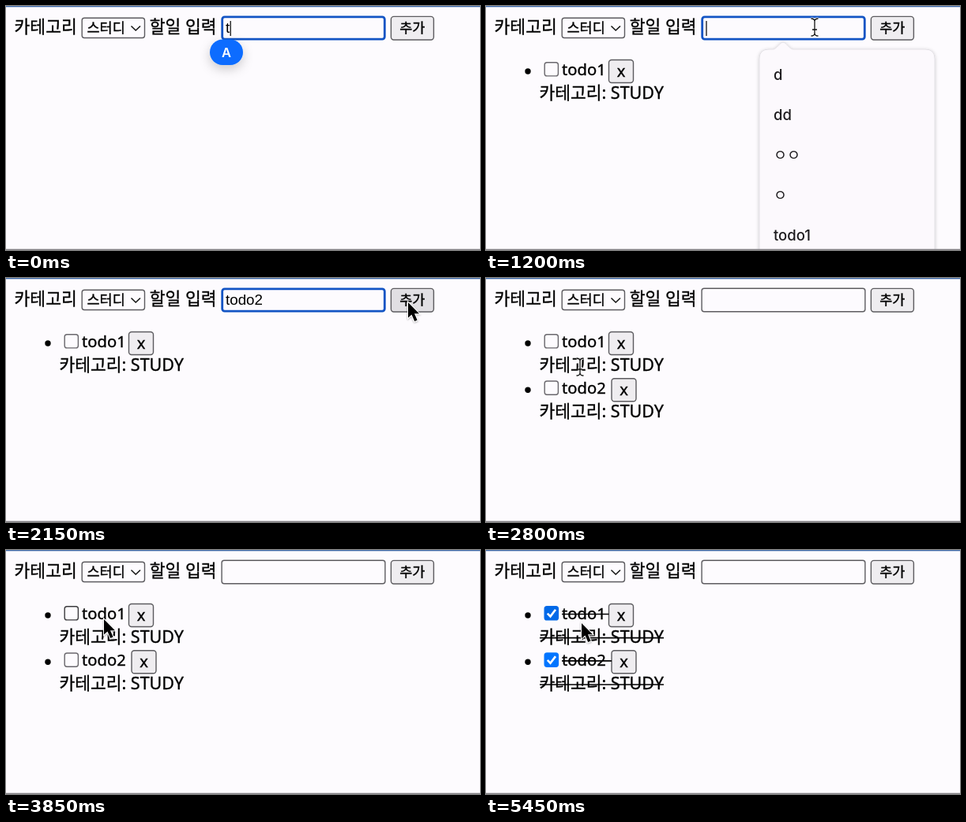
Recreate the animation shown at these times as an HTML page. Size 600x310 px, loop 5500 ms.

```html
<!DOCTYPE html>
<html lang="ko">
<head>
<meta charset="utf-8">
<title>할일</title>
<style>
html, body { margin: 0; width: 100%; height: 100%; overflow: hidden; background: #fdfbfe; }
svg { display: block; width: 600px; height: 310px; }
text { white-space: pre; font-family: "Noto Sans", "Noto Sans CJK KR", "Noto Sans CJK", sans-serif; }
.label, .task, .control { stroke: #000; stroke-width: .35; }
.label { font-size: 21.5px; }
.task { font-size: 20.2px; }
.control { font-size: 17.5px; }
.field { font: 18.8px "Liberation Sans", Arial, sans-serif; }
.option { font: 500 18.5px Inter, "Noto Sans CJK KR", "Noto Sans CJK", sans-serif; fill: #1d1b1e; }
.box { fill: #fdfbfe; stroke: #5c5b5f; stroke-width: 1.4; }
.button { fill: #efedf0; stroke: #5c5b5f; stroke-width: 1.4; }
</style>
</head>
<body>
<svg id="stage" viewBox="0 0 600 310">
  <defs>
    <filter id="soft" x="-50%" y="-50%" width="200%" height="220%">
      <feDropShadow dx="0" dy="5" stdDeviation="7" flood-opacity=".2"/>
    </filter>
    <filter id="glow" x="-10%" y="-10%" width="120%" height="120%">
      <feDropShadow dx="0" dy="1" stdDeviation="2" flood-opacity=".22"/>
    </filter>
    <filter id="drop" x="-50%" y="-30%" width="200%" height="170%">
      <feDropShadow dx="0" dy="1" stdDeviation="1" flood-opacity=".35"/>
    </filter>
    <clipPath id="page"><rect width="600" height="309"/></clipPath>
    <path id="beamShape" d="M-4.5 -11Q0 -11 0 -7.5V7.5Q0 11 -4.5 11M4.5 -11Q0 -11 0 -7.5V7.5Q0 11 4.5 11M-3 3H3"/>
  </defs>
  <rect width="600" height="310" fill="#fdfbfe"/>
  <rect width="600" height="1.3" fill="#3c66a6"/>

  <text class="label" x="10.6" y="33.5">카테고리</text>
  <rect class="box" x="96.2" y="15.2" width="79.3" height="25.3" rx="3"/>
  <text class="control" x="102.5" y="34">스터디</text>
  <path d="M158.5 25.5L164.2 31L170 25.5" fill="none" stroke="#111" stroke-width="1.5"/>
  <text class="label" x="181.8" y="33.5">할일 입력</text>
  <rect id="input" y="13"/>
  <text id="typed" class="field" x="278" y="34"></text>
  <rect id="caret" y="19" width="1.2" height="19"/>
  <rect id="add" class="button" x="487.4" y="13.4" width="54" height="29.6" rx="3.5"/>
  <text class="control" x="514.3" y="34" text-anchor="middle">추가</text>

  <g id="list"></g>

  <g id="badge">
    <rect x="258" y="42.5" width="42" height="32.5" rx="16.2" fill="#086cff" filter="url(#soft)"/>
    <text x="279" y="65" text-anchor="middle" fill="#fff" style="font:600 16.5px Inter,sans-serif">A</text>
  </g>
  <g id="popup" clip-path="url(#page)">
    <path id="panel" fill="#fcf9fd" stroke="#dedbe0" stroke-width=".8" filter="url(#glow)"/>
    <g id="options"></g>
  </g>
  <rect y="308.7" width="600" height="1.3" fill="#858387"/>

  <path id="arrow" d="M1 1V20.6L5.5 16.5L9.2 25L12.6 23.5L9 15.3H15Z" stroke="#fff" stroke-width="2" paint-order="stroke" filter="url(#drop)"/>
  <g id="beam" fill="none">
    <use href="#beamShape" stroke="#fff" stroke-width="3"/>
    <use href="#beamShape" stroke="#111" stroke-width="1.3"/>
  </g>
</svg>
<script>
const LOOP = 5500;
const $ = id => document.getElementById(id);
const show = (node, on) => node.setAttribute("visibility", on ? "visible" : "hidden");
const set = (node, attrs) => Object.entries(attrs).forEach(([k, v]) => node.setAttribute(k, v));
const within = (t, from, to) => t >= from && t < to;

const tasks = [
  { name: "todo1", y: 0, buttonX: 155.5, added: 850, checked: 4750, hover: t => within(t, 3150, 3950) || t >= 4450 },
  { name: "todo2", y: 59.3, buttonX: 159, added: 2250, checked: 4100, hover: t => within(t, 4000, 4400) }
];

// Pointer stops: time, x, y
const stops = [
  [450, 436, 30], [550, 449, 32], [800, 508, 30], [950, 508, 30],
  [1150, 416, 27], [1900, 416, 27], [2100, 508, 30], [2500, 508, 30],
  [2800, 119, 113], [3050, 114, 96], [3200, 118, 93], [3650, 123, 87],
  [3850, 123, 87], [4050, 121, 131], [4300, 121, 131], [4500, 120, 92]
];

function taskMarkup({ name, y, buttonX }) {
  return `<g transform="translate(0 ${y})" visibility="hidden">
    <circle cx="53" cy="83" r="3.7"/>
    <rect class="check" x="74.2" y="71.7" width="17.2" height="17.2" rx="3" stroke-width="1.4"/>
    <path class="tick" d="M77.8 80.6L81.5 84.4L88 75.8" fill="none" stroke="#fff" stroke-width="2.6"/>
    <text class="task" x="96" y="88">${name}</text>
    <rect class="button" x="${buttonX}" y="68.5" width="31" height="29" rx="3.5"/>
    <text class="task" x="${buttonX + 15.5}" y="89.5" text-anchor="middle">x</text>
    <text class="label" x="67.4" y="118">카테고리: STUDY</text>
    <path class="strike" d="M96 81.5H${buttonX}M68 111.7H225" stroke="#000" stroke-width="1.7"/>
  </g>`;
}
$("list").innerHTML = tasks.map(taskMarkup).join("");
const rows = [...$("list").children];

function typedText(t) {
  if (t < 850) return "todo1".slice(0, 1 + Math.floor(t / 100));
  if (within(t, 1300, 2250)) return "todo2".slice(0, 1 + Math.floor((t - 1300) / 100));
  return "";
}

function drawInput(t) {
  const focused = t < 850 || within(t, 1100, 2250);
  const inset = focused ? 1.2 : 0.6;
  set($("input"), {
    x: 272.5 + inset, y: 12.7 + inset, width: 208 - 2 * inset, height: 30.6 - 2 * inset, rx: 3,
    fill: "#fdfbfe", stroke: focused ? "#1254c4" : "#5c5b5f", "stroke-width": focused ? 2.8 : 1.4
  });
  $("typed").textContent = typedText(t);
  $("caret").setAttribute("x", 278.4 + $("typed").getComputedTextLength());
  show($("caret"), t < 650 || within(t, 1100, 1850));
  const overAdd = within(t, 750, 1000) || within(t, 2050, 2560);
  $("add").style.fill = overAdd ? "#e1dfe3" : "";
  show($("badge"), t < 250);
}

function drawPopup(t) {
  const filtered = within(t, 50, 400) || within(t, 1300, 1700);
  const full = within(t, 1150, 1300);
  show($("popup"), filtered || full);
  const names = full ? ["d", "dd", "ㅇㅇ", "ㅇ", "todo1", "todo2"] : ["todo1", "todo2"];
  const bottom = 69 + 51 * names.length;
  $("panel").setAttribute("d", `M358 55H363C368 55 372 46 376 46S384 55 389 55H556Q568 55 568 67
    V${bottom - 12}Q568 ${bottom} 556 ${bottom}H358Q346 ${bottom} 346 ${bottom - 12}V67Q346 55 358 55Z`);
  $("options").innerHTML = names.map((name, i) =>
    `<text class="option" x="364" y="${93.5 + 51 * i}">${name}</text>`).join("");
}

function drawTasks(t) {
  tasks.forEach((task, i) => {
    const row = rows[i];
    const visible = t >= task.added;
    const done = t >= task.checked;
    const hover = task.hover(t);
    show(row, visible);
    const fill = hover ? "#0069e8" : "#0075ff";
    set(row.querySelector(".check"), {
      fill: done ? fill : "#fdfbfe",
      stroke: done ? fill : hover ? "#3c3b3e" : "#69676c"
    });
    show(row.querySelector(".tick"), visible && done);
    show(row.querySelector(".strike"), visible && done);
  });
}

function pointerAt(t) {
  const next = stops.findIndex(stop => stop[0] > t);
  if (next < 0) return stops[stops.length - 1].slice(1);
  if (next === 0) return stops[0].slice(1);
  const [t0, x0, y0] = stops[next - 1];
  const [t1, x1, y1] = stops[next];
  const u = (t - t0) / (t1 - t0);
  const k = u * u * (3 - 2 * u);
  return [x0 + (x1 - x0) * k, y0 + (y1 - y0) * k];
}

function drawPointer(t) {
  const [x, y] = pointerAt(t);
  const visible = within(t, 450, 1300) || t >= 1900;
  const overInput = within(t, 950, 2500) && x < 480;
  const overText = within(t, 2700, 3000) && x < 225 && y > 100;
  const beam = overInput || overText;
  const place = `translate(${x} ${y})`;
  $("arrow").setAttribute("transform", place);
  $("beam").setAttribute("transform", place);
  show($("arrow"), visible && !beam);
  show($("beam"), visible && beam);
}

function draw(t) {
  drawInput(t);
  drawPopup(t);
  drawTasks(t);
  drawPointer(t);
}

const start = performance.now();
function frame() {
  draw((performance.now() - start) % LOOP);
  requestAnimationFrame(frame);
}
frame();
</script>
</body>
</html>
```
